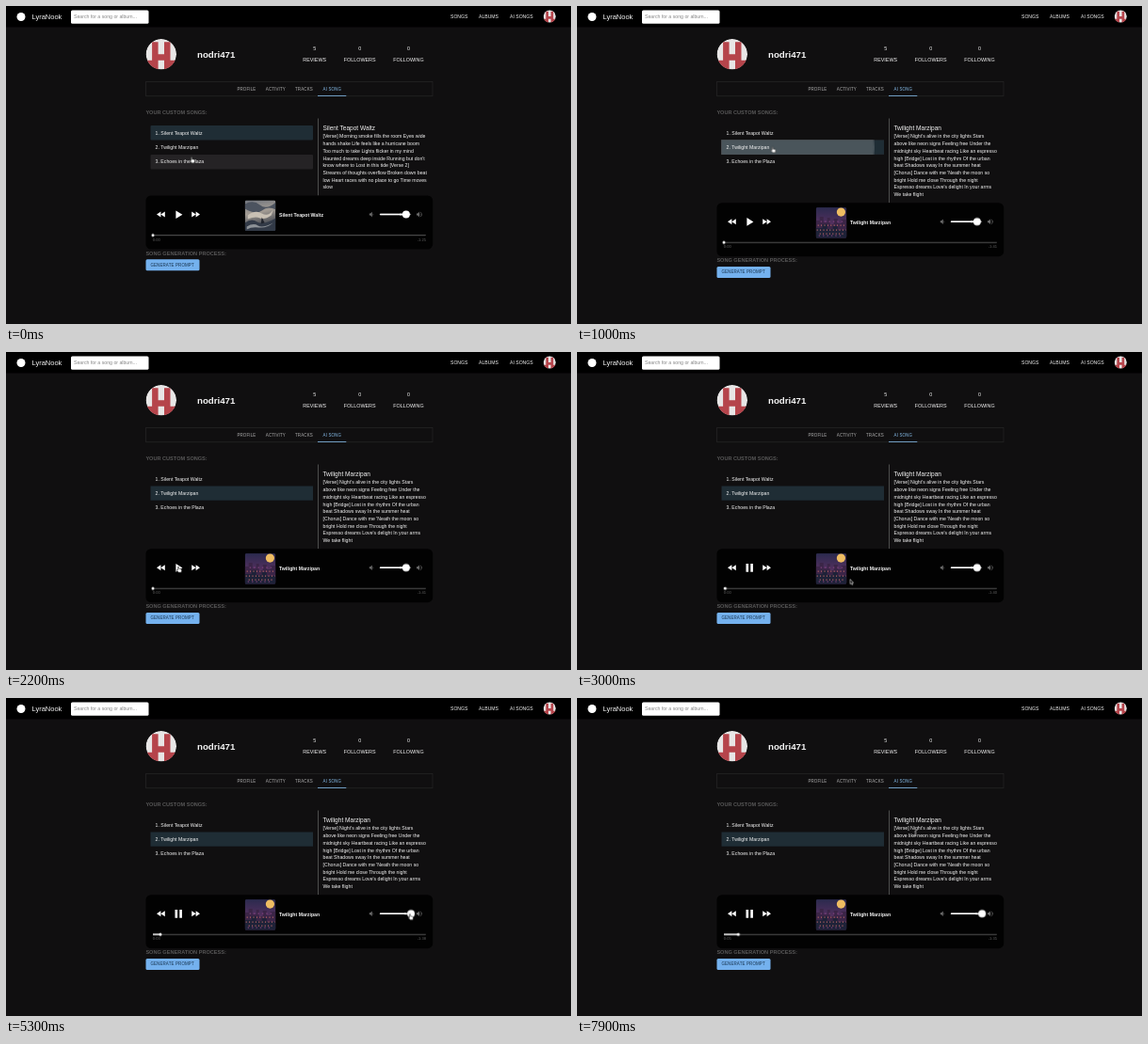
An HTML page that plays this animation: 600 by 338 pixels, repeating every 8 s.

```html
<!DOCTYPE html>
<html lang="en">
<head>
<meta charset="utf-8">
<title>Song player</title>
<style>
  html, body { margin: 0; width: 100%; height: 100%; overflow: hidden; background: #100f10; }
  svg { display: block; width: 100vw; height: 100vh; }
  text { font: 5.2px "Liberation Sans", Arial, sans-serif; fill: #f4f4f4; }
  .brand { font-size: 7.5px; }
  .nav { font-size: 5.1px; }
  .user { font-size: 9.7px; font-weight: bold; }
  .stat { font-size: 5.4px; text-anchor: middle; }
  .tab, .btn { font-size: 4.47px; letter-spacing: .02857em; }
  .tab { fill: #adadad; }
  .on { fill: #86bdeb; }
  .btn { fill: #15304a; }
  .head { font-size: 5.59px; font-weight: bold; fill: #585858; }
  .title { font-size: 6.56px; }
  .bold { font-weight: bold; }
  .time { font-size: 4.1px; fill: #626262; }
  .end { text-anchor: end; }

  .first, .second, .lower, .paused, .playing, .hand, .arrow, .beam { animation: 8s step-end infinite; }
  .first { animation-name: first; }
  .second { animation-name: second; }
  .lower { animation-name: lower; }
  .paused { animation-name: paused; }
  .playing { animation-name: playing; }
  .hand { animation-name: hand; }
  .arrow { animation-name: arrow; }
  .beam { animation-name: beam; }
  @keyframes first { 0% { visibility: visible } 12.5% { visibility: hidden } }
  @keyframes second { 0% { visibility: hidden } 12.5% { visibility: visible } }
  @keyframes lower { 0% { transform: none } 12.5% { transform: translateY(7.7px) } }
  @keyframes paused { 0% { visibility: visible } 31.5% { visibility: hidden } }
  @keyframes playing { 0% { visibility: hidden } 31.5% { visibility: visible } }
  @keyframes hand {
    0%, 22.5%, 47.5% { visibility: visible }
    13.75%, 33.75%, 82.5% { visibility: hidden }
  }
  @keyframes arrow {
    0%, 22.5%, 47.5%, 92.5% { visibility: hidden }
    13.75%, 33.75%, 82.5% { visibility: visible }
  }
  @keyframes beam { 0% { visibility: hidden } 92.5% { visibility: visible } }

  .hover3 { animation: hover3 8s linear infinite; }
  .hover2 { animation: hover2 8s linear infinite; }
  .ripple { animation: ripple 8s infinite; }
  .seek { animation: seek 8s linear infinite; }
  .played { animation: played 8s linear infinite; }
  .volume { animation: volume 8s ease-in-out infinite; }
  .cursor { animation: move 8s ease-in-out infinite; }
  @keyframes hover3 { 0%, 4.7% { opacity: 1 } 6.6%, 100% { opacity: 0 } }
  @keyframes hover2 { 0%, 4.7% { opacity: 0 } 6.6%, 13.5% { opacity: 1 } 15.4%, 100% { opacity: 0 } }
  @keyframes ripple {
    0%, 8% { transform: scale(0); opacity: .12; animation-timing-function: cubic-bezier(.4, 0, .2, 1) }
    14.875% { transform: scale(1); opacity: .2 }
    18%, 100% { transform: scale(1); opacity: 0 }
  }
  @keyframes seek { 0%, 31.5% { transform: none } 100% { transform: translateX(15.67px) } }
  @keyframes played { 0%, 31.5% { transform: scaleX(0) } 100% { transform: scaleX(15.67) } }
  @keyframes volume { 0%, 55% { transform: none } 67.5%, 100% { transform: translateX(5.3px) } }
  @keyframes move {
    0%, 3% { transform: translate(197px, 160.5px) }
    7.5%, 12.5% { transform: translate(207.5px, 149.5px) }
    18.75% { transform: translate(194.5px, 212px) }
    25%, 32% { transform: translate(183px, 228px) }
    37.5% { transform: translate(290px, 241.5px) }
    48.75%, 55% { transform: translate(423px, 229px) }
    67.5% { transform: translate(429px, 229.5px) }
    77%, 83.75% { transform: translate(436px, 229.5px) }
    95%, 100% { transform: translate(359.5px, 144px) }
  }
</style>
</head>
<body>
<svg viewBox="0 0 600 338" preserveAspectRatio="none">
  <defs>
    <linearGradient id="storm" x2=".2" y2="1">
      <stop offset="0" stop-color="#6f747d"/>
      <stop offset=".45" stop-color="#a39c94"/>
      <stop offset="1" stop-color="#2c3340"/>
    </linearGradient>
    <linearGradient id="dusk" x2="0" y2="1">
      <stop offset="0" stop-color="#2b2a4e"/>
      <stop offset=".55" stop-color="#54305f"/>
      <stop offset="1" stop-color="#241d33"/>
    </linearGradient>
    <clipPath id="row"><rect x="153.5" y="142.5" width="172.5" height="15.5"/></clipPath>
    <clipPath id="disc"><circle r="16.2"/></clipPath>
    <clipPath id="cover"><rect width="32.5" height="32.5" rx="1.5"/></clipPath>
    <g id="avatar" clip-path="url(#disc)">
      <circle r="16.2" fill="#e8e6e6"/>
      <path fill="#b5444b" d="M-9.7-13h6.5V0h6.4v-13h6.5V6.5h6.5v9.7h-13V6.5h-6.4v9.7h-13V6.5h6.5z"/>
    </g>
    <path id="skip" d="M0 0l4.4-3v6zM4.4 0l4.4-3v6z"/>
    <path id="speaker" d="M0-1h1.2l1.8-1.8v5.6L1.2 1H0z"/>
  </defs>

  <rect width="600" height="338" fill="#100f10"/>
  <rect width="600" height="22.5"/>
  <circle cx="16" cy="11.5" r="4.5" fill="#fff"/>
  <text class="brand" x="27.5" y="13.8">LyraNook</text>
  <rect x="69" y="4.5" width="82.5" height="14.3" rx="1.5" fill="#fff"/>
  <text x="72" y="13.4" style="fill:#858585">Search for a song or album...</text>
  <text class="nav" x="472" y="12.9">SONGS</text>
  <text class="nav" x="502" y="12.9">ALBUMS</text>
  <text class="nav" x="535" y="12.9">AI SONGS</text>
  <use href="#avatar" transform="translate(577.3 11) scale(.41)"/>

  <use href="#avatar" x="164.8" y="51.2"/>
  <text class="user" x="203" y="54.6">nodri471</text>
  <text class="stat" x="327.7" y="47">5</text>
  <text class="stat" x="375.7" y="47">0</text>
  <text class="stat" x="427.5" y="47">0</text>
  <text class="stat" x="327.7" y="58.5">REVIEWS</text>
  <text class="stat" x="375.7" y="58.5">FOLLOWERS</text>
  <text class="stat" x="427.5" y="58.5">FOLLOWING</text>

  <rect x="148.7" y="80.3" width="304.3" height="15.5" fill="none" stroke="#2b2b2b" stroke-width=".6"/>
  <text class="tab" x="245.4" y="89.6">PROFILE</text>
  <text class="tab" x="275.8" y="89.6">ACTIVITY</text>
  <text class="tab" x="307" y="89.6">TRACKS</text>
  <text class="tab on" x="336.6" y="89.6">AI SONG</text>
  <rect x="331" y="95.2" width="30.3" height=".8" fill="#86bdeb"/>

  <text class="head" x="148.4" y="114.8">YOUR CUSTOM SONGS:</text>
  <rect class="hover3" x="153.5" y="158" width="172.5" height="15.5" rx="1" fill="#252325"/>
  <rect class="hover2" x="153.5" y="142.5" width="172.5" height="15.5" fill="#252425"/>
  <rect class="first" x="153.5" y="127" width="172.5" height="15.5" rx="1" fill="#1f2d35"/>
  <rect class="second" x="153.5" y="142.5" width="172.5" height="15.2" fill="#1f2d35"/>
  <g clip-path="url(#row)"><g transform="translate(207.5 150)">
    <circle class="ripple" r="118" fill="#fff"/>
  </g></g>
  <text x="158.6" y="136.5">1. Silent Teapot Waltz</text>
  <text x="158.6" y="152">2. Twilight Marzipan</text>
  <text x="158.6" y="167.4">3. Echoes in the Plaza</text>

  <rect class="first" x="331" y="119.5" width=".9" height="82" fill="#555"/>
  <rect class="second" x="331" y="119.5" width=".9" height="89.7" fill="#555"/>
  <g id="song1" class="first"><text class="title" x="336.4" y="131.5">Silent Teapot Waltz</text></g>
  <g id="song2" class="second"><text class="title" x="336.4" y="131.5">Twilight Marzipan</text></g>

  <g class="lower">
    <rect x="148.5" y="201.5" width="304.7" height="57" rx="5.5" fill="#020202"/>
    <g fill="#fff">
      <use href="#skip" x="160" y="221.6"/>
      <use href="#skip" transform="translate(206 221.6) scale(-1 1)"/>
      <path class="paused" d="M180.4 217.4l7 4.3-7 4.3z"/>
      <path class="playing" d="M179.5 217.3h2.6v8.8h-2.6zM184.3 217.3h2.6v8.8h-2.6z"/>
    </g>

    <g transform="translate(253.7 206.4)" clip-path="url(#cover)">
      <g class="first">
        <rect width="33" height="33" fill="url(#storm)"/>
        <path d="M0 4q9-5 16 1t17-3v8q-9-4-15 1T0 9z" fill="#4c535f"/>
        <path d="M3 16q8-6 15-2t12-4l-2 6q-7 5-12 3T3 20z" fill="#c8c0b4"/>
        <path d="M0 24q7-5 13-1t20-4v14H0z" fill="#323a47"/>
        <path d="M2 28q7-4 12-1t16-3q-7 6-15 5t-13 2z" fill="#8d9297"/>
        <path d="M17 25l1-7 3 6z" fill="#20242c"/>
      </g>
      <g class="second">
        <rect width="33" height="33" fill="url(#dusk)"/>
        <circle cx="26.7" cy="5" r="4.6" fill="#efbd62"/>
        <path d="M0 14h4v-4h4v6h4v-5h3v7h4v-6h4v5h4v-4h6v20H0z" fill="#3b2547"/>
        <path d="M0 22h7v-4h5v5h6v-3h5v4h10v9H0z" fill="#1e2238"/>
        <path d="M2 19h30M1 24h31M4 28h26" stroke="#c46a68" stroke-width="1.1" stroke-dasharray="1 2.4" fill="none"/>
        <path d="M5 15h24M3 30h26" stroke="#8c4785" stroke-dasharray="1.4 3" fill="none"/>
      </g>
    </g>
    <text class="bold first" x="290" y="224.3">Silent Teapot Waltz</text>
    <text class="bold second" x="290" y="224.3">Twilight Marzipan</text>

    <g fill="#6b6b6b" stroke="#6b6b6b" stroke-width="0">
      <use href="#speaker" x="385.8" y="221.6"/>
      <path d="M389.6 220.2q1.4 1.4 0 2.8z"/>
      <use href="#speaker" x="436" y="221.6"/>
      <path d="M439.8 220.2q1.4 1.4 0 2.8z"/>
      <path d="M439.8 219q3.6 2.6 0 5.2" fill="none" stroke-width=".7"/>
    </g>
    <rect x="396.8" y="220.8" width="33.4" height="1.5" rx=".75" fill="#777"/>
    <rect x="396.8" y="220.8" width="28" height="1.5" rx=".75" fill="#fff"/>
    <g class="volume">
      <rect x="418" y="220.8" width="7" height="1.5" fill="#fff"/>
      <circle cx="424.9" cy="221.6" r="4" fill="#fff"/>
    </g>

    <rect x="156" y="242.9" width="290" height="1.4" rx=".7" fill="#474747"/>
    <g transform="translate(156 243.6)">
      <rect class="played" y="-.7" width="1" height="1.4" fill="#fff"/>
      <circle class="seek" r="1.5" fill="#fff"/>
    </g>
    <text class="time" id="elapsed" x="155.8" y="249.8">0:00</text>
    <text class="time end" id="left" x="446" y="249.8">-1:25</text>

    <text class="head" x="148.4" y="264.8">SONG GENERATION PROCESS:</text>
    <rect x="148.5" y="269.2" width="57" height="12" rx="1.5" fill="#74b1ee"/>
    <text class="btn" x="153.4" y="276.8">GENERATE PROMPT</text>
  </g>

  <g class="cursor" stroke-linejoin="round">
    <path class="hand" d="M-.5.4q.6-.7 1.1 0v2l2.4.5q.7.2.6 1l-.4 2.3H.3L-1.8 3.9q.2-.7 1.3 0z" fill="#fff" stroke="#111" stroke-width=".5"/>
    <path class="arrow" d="M0 0v5.2l1.2-1.1.8 1.9.9-.4-.8-1.8h1.6z" fill="#111" stroke="#fff" stroke-width=".5"/>
    <path class="beam" d="M-1-2.8q1 0 1 .7v4.2q0 .7-1 .7M1-2.8q-1 0-1 .7v4.2q0 .7 1 .7" fill="none" stroke="#ddd" stroke-width=".5"/>
  </g>
</svg>
<script>
  const LOOP = 8000, SWITCH = 1000, PLAY = 2520, LENGTH = 101.2;
  const byId = id => document.getElementById(id);

  function addLyrics(id, lines) {
    lines.forEach((line, i) => {
      const text = document.createElementNS('http://www.w3.org/2000/svg', 'text');
      text.setAttribute('x', 336.5);
      text.setAttribute('y', 140.4 + i * 7.7);
      text.textContent = line;
      byId(id).append(text);
    });
  }

  addLyrics('song1', [
    '[Verse] Morning smoke fills the room Eyes wide',
    'hands shake Life feels like a hurricane boom',
    'Too much to take Lights flicker in my mind',
    "Haunted dreams deep inside Running but don't",
    'know where to Lost in this tide [Verse 2]',
    'Streams of thoughts overflow Broken down beat',
    'low Heart races with no place to go Time moves',
    'slow'
  ]);
  addLyrics('song2', [
    "[Verse] Night's alive in the city lights Stars",
    'above like neon signs Feeling free Under the',
    'midnight sky Heartbeat racing Like an espresso',
    'high [Bridge] Lost in the rhythm Of the urban',
    'beat Shadows sway In the summer heat',
    "[Chorus] Dance with me 'Neath the moon so",
    'bright Hold me close Through the night',
    "Espresso dreams Love's delight In your arms",
    'We take flight'
  ]);

  const clock = s => Math.floor(s / 60) + ':' + String(s % 60).padStart(2, '0');
  let start;
  function tick(now) {
    start ??= now;
    const t = (now - start) % LOOP;
    const pos = Math.max(0, t - PLAY) / 1000;
    byId('elapsed').textContent = clock(Math.round(pos));
    byId('left').textContent = '-' + clock(t < SWITCH ? 85 : Math.floor(LENGTH - pos));
    requestAnimationFrame(tick);
  }
  requestAnimationFrame(tick);
</script>
</body>
</html>
```
